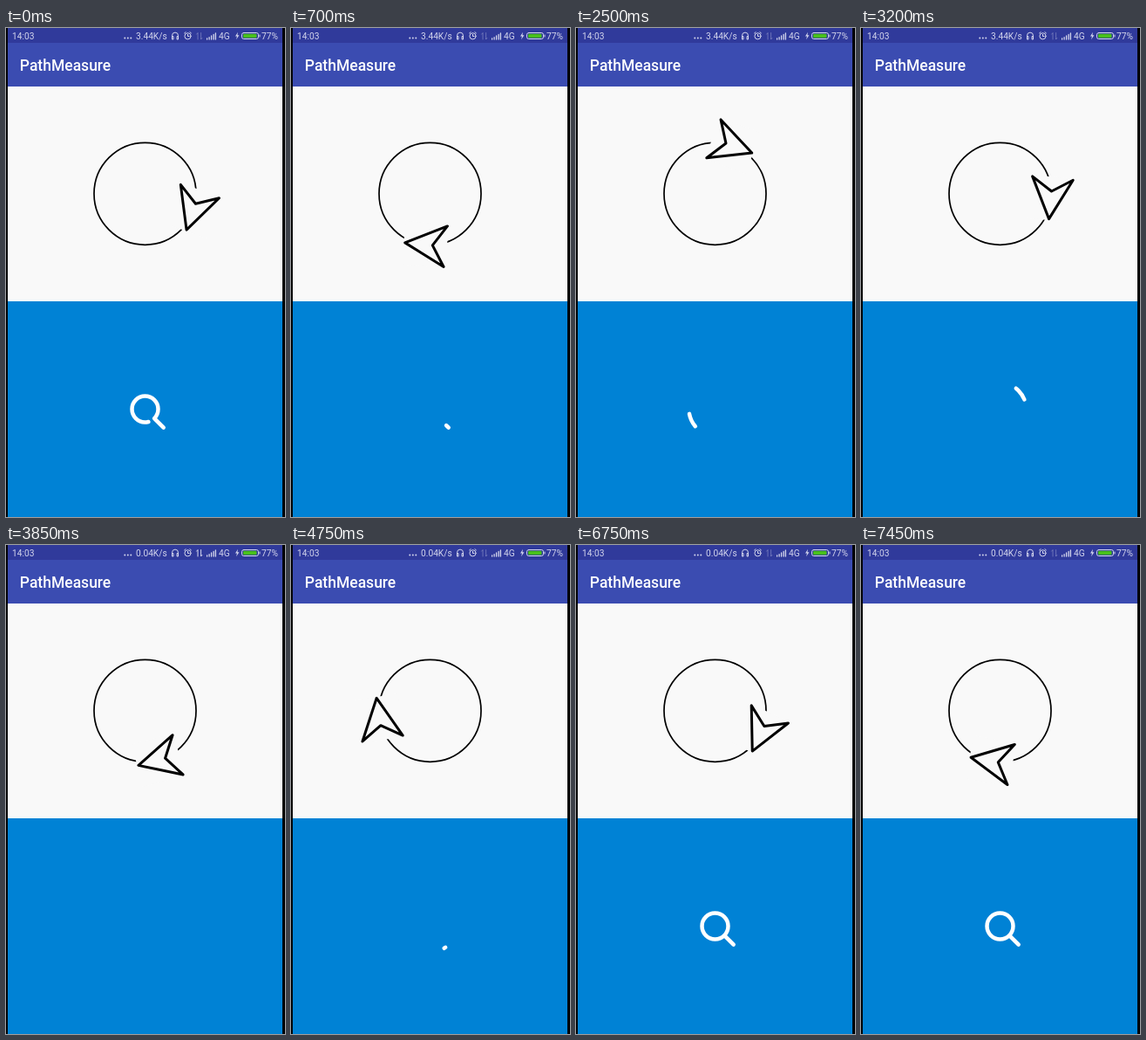
Write an HTML page that moves like this. It is 320 by 560 pixels and loops after 7.5 s.

```html
<!DOCTYPE html>
<html lang="en">
<head>
<meta charset="utf-8">
<title>PathMeasure</title>
<style>
  html, body { margin: 0; width: 100%; height: 100%; overflow: hidden; background: #000; }
  svg { display: block; width: 320px; height: 560px; }
  text { font-family: Roboto, "Noto Sans", sans-serif; }
  .status text { font-size: 10.2px; fill: #d3d5ec; }
  .line { fill: none; stroke: #d3d5ec; stroke-width: 1; stroke-linecap: round; stroke-linejoin: round; }
</style>
</head>
<body>
<svg viewBox="0 0 320 560">
  <rect width="320" height="560" fill="#000"/>
  <rect x="2" width="315" height="17" fill="#303a9b"/>
  <rect x="2" y="17" width="315" height="50" fill="#3b4cb1"/>
  <rect x="2" y="67" width="315" height="246" fill="#f9f9f9"/>
  <rect x="2" y="313" width="315" height="247" fill="#0082d5"/>

  <g class="status">
    <text x="7" y="13">14:03</text>
    <g fill="#d3d5ec">
      <circle cx="136.3" cy="11.5" r="1"/><circle cx="139.8" cy="11.5" r="1"/><circle cx="143.3" cy="11.5" r="1"/>
    </g>
    <text id="speed" x="149" y="13"></text>
    <path class="line" d="M190.5 10V8.8a3.5 3.7 0 0 1 7 0V10M190.5 10v3h1.5v-3zM197.5 10v3h-1.5v-3z"/>
    <g class="line">
      <circle cx="208.5" cy="9.3" r="3.6"/>
      <path d="M208.5 7.3v2.2h1.6M204.6 5.9l1.5-1.2M212.4 5.9l-1.5-1.2"/>
    </g>
    <path id="traffic" class="line" d="M220 13V5.5l-1.3 1.6M223.6 5.5V13l1.3-1.6"/>
    <path class="line" stroke-linecap="butt" style="stroke-width:1.3" d="M230.6 13v-1.2M233.1 13v-2.4M235.6 13v-4M238.1 13v-5.5M240.4 13v-7"/>
    <text x="244" y="13">4G</text>
    <path d="M266 4.8l-3 4.6h2l-.9 3.8 3.3-5h-2z" fill="#d3d5ec"/>
    <rect class="line" x="270.5" y="5.5" width="19" height="7" rx="2.2"/>
    <path class="line" d="M291 8v2"/>
    <rect x="272" y="6.8" width="15.5" height="4.5" rx="1" fill="#48c01c"/>
    <text x="293" y="13">77%</text>
  </g>
  <text x="15.8" y="49" font-size="17.5" font-weight="500" fill="#fff">PathMeasure</text>

  <circle cx="159.5" cy="189.8" r="58.5" fill="none" stroke="#000" stroke-width="1.7"/>
  <g id="arrow">
    <rect x="-24.9" y="-25" width="49.8" height="50" fill="#f9f9f9"/>
    <path d="M23.4 0L-23.3-23.4L-8.3 0L-23.3 23.4Z" fill="none" stroke="#000" stroke-width="3" stroke-linejoin="round"/>
  </g>

  <g transform="translate(159.5 436.5) scale(.3)" fill="none" stroke="#fff" stroke-width="15" stroke-linecap="round" stroke-linejoin="round">
    <path id="lens"/>
    <path id="orbit"/>
  </g>
</svg>
<script>
const LOOP = 7500, STEP = 50;
const $ = id => document.getElementById(id);
const arrow = $('arrow'), lens = $('lens'), orbit = $('orbit');

// Both paths start at 45 degrees; the lens runs clockwise and ends in the handle.
const fullTurn = (r, sweep) => {
  const c = r * Math.SQRT1_2;
  return `M${c} ${c}A${r} ${r} 0 0 ${sweep} ${-c} ${-c}A${r} ${r} 0 0 ${sweep} ${c} ${c}`;
};
const handleEnd = 100 * Math.SQRT1_2;
lens.setAttribute('d', fullTurn(50, 1) + `L${handleEnd} ${handleEnd}`);
orbit.setAttribute('d', fullTurn(100, 0));
const lensLength = 100 * Math.PI + 50, orbitLength = 200 * Math.PI;

// Heading of the arrow's place on the circle: [ms, degrees]
const turns = [[0, 19.2], [1400, 171.5], [2500, 290.3], [3850, 435.1],
               [4750, 531.5], [6000, 665.4], [7450, 820.2]];

const PHASE = 1008, DURATION = 1000, FIRST_SEARCH = 836, SEARCHES = 4;

function angleAt(t) {
  let i = 1;
  while (i < turns.length - 1 && t > turns[i][0]) i++;
  const [t0, a0] = turns[i - 1], [t1, a1] = turns[i];
  return a0 + (a1 - a0) * (t - t0) / (t1 - t0);
}

function showSegment(path, start, stop) {
  const length = stop - start;
  path.style.display = length > 0.05 ? '' : 'none';
  path.setAttribute('stroke-dasharray', `${length} 2000`);
  path.setAttribute('stroke-dashoffset', -start);
}

function drawSearch(t) {
  const phase = Math.floor((t - FIRST_SEARCH) / PHASE);
  const x = Math.min(1, (t - FIRST_SEARCH - phase * PHASE) / DURATION);
  const v = 0.5 - 0.5 * Math.cos(Math.PI * x);
  let lensStart = 1, orbitStart = 0, orbitStop = 0;
  if (phase < 0) lensStart = v;
  else if (phase < SEARCHES) {
    orbitStop = orbitLength * v;
    orbitStart = orbitStop - (0.5 - Math.abs(v - 0.5)) * 200;
  } else lensStart = phase === SEARCHES ? 1 - v : 0;
  showSegment(lens, lensLength * lensStart, lensLength);
  showSegment(orbit, orbitStart, orbitStop);
}

function render(t) {
  arrow.setAttribute('transform',
    `translate(159.5 189.8) rotate(${angleAt(t)}) translate(58.5 0) rotate(90)`);
  drawSearch(t);
  $('speed').textContent = (t < 3300 ? '3.44' : '0.04') + 'K/s';
  const busy = (t >= 3300 && t < 4300) || (t >= 5400 && t < 6500);
  $('traffic').style.opacity = busy ? 1 : 0.35;
}

const begin = performance.now();
function frame() {
  const t = (performance.now() - begin) % LOOP;
  render(Math.floor(t / STEP) * STEP);
  requestAnimationFrame(frame);
}
render(0);
requestAnimationFrame(frame);
</script>
</body>
</html>
```
